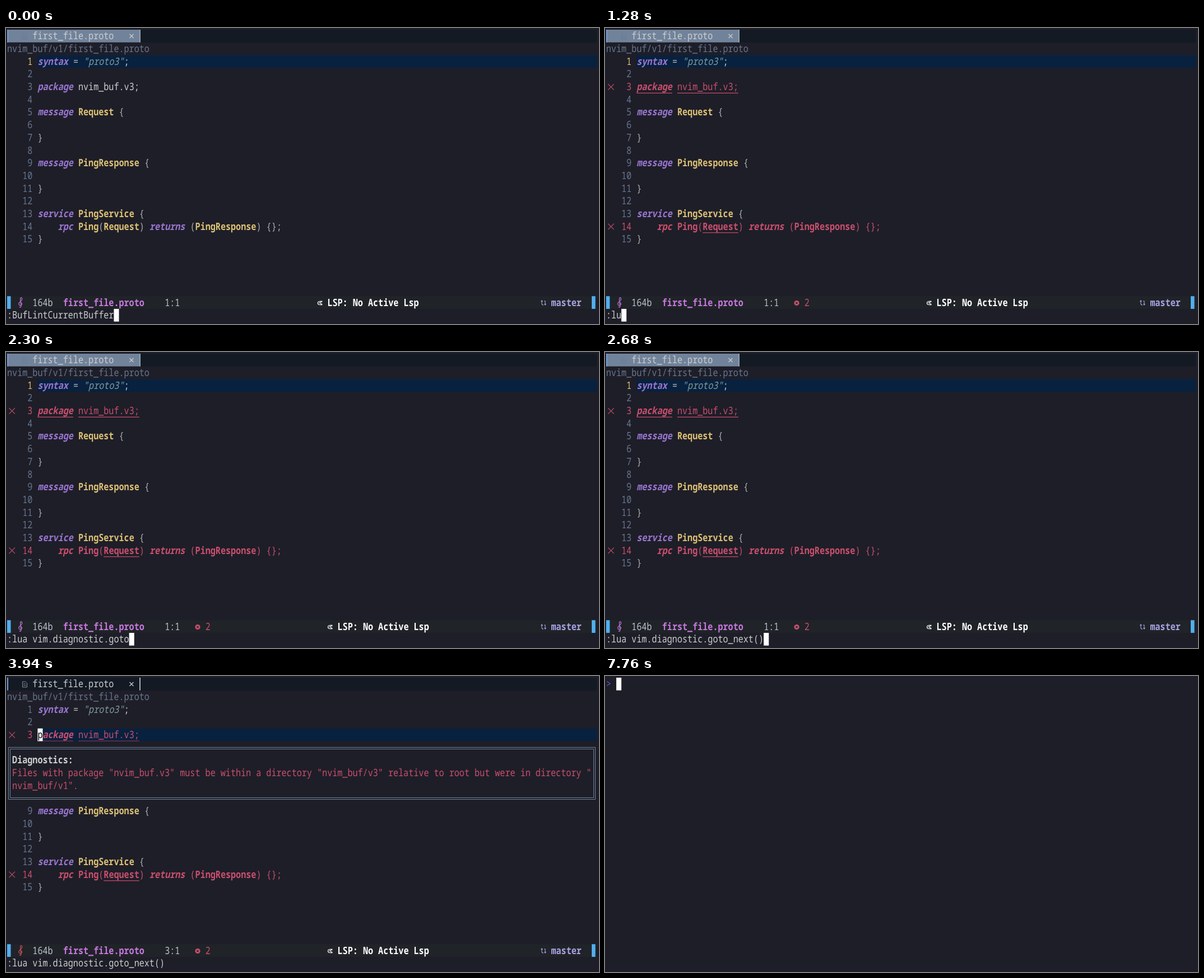
These frames come from a looping animation (1058 px wide and 529 px high, 8000 ms). An HTML page:

```html
<!DOCTYPE html>
<html lang="en">
<head>
<meta charset="utf-8">
<title>Editor lint session</title>
<style>
  html, body { margin: 0; width: 100%; height: 100%; overflow: hidden; background: #1e1e28; }
  svg { display: block; width: 100vw; height: 100vh; }
  text {
    font: 15.12px "Noto Sans Mono", "DejaVu Sans Mono", monospace;
    white-space: pre;
    text-rendering: geometricPrecision;
  }
  .bold, .keyword, .type { font-weight: 600; }
  .keyword, .string { font-style: italic; }
</style>
</head>
<body>
<svg id="stage" viewBox="0 0 1058 529"></svg>
<script>
const LOOP = 8000;
const CELL = { w: 9.07, h: 22.68, left: 2, top: 3 };
const COLS = 116;
const COLOR = {
  bg: '#1e1e28', bar: '#131a24', status: '#202328', tab: '#71839b',
  cursorLine: '#08213f', muted: '#66768e', text: '#cdcecf', plain: '#aeafb0',
  keyword: '#9876d0', type: '#dbc074', string: '#7f9c96', error: '#c94f6d',
  blue: '#51afef', magenta: '#c678dd', violet: '#a9a1e1', red: '#d3505f',
  prompt: '#5b56e0', white: '#ffffff'
};

// Each token is [text, style]; tokens follow each other on the cell grid.
const SOURCE = {
  1: [['syntax', 'keyword'], [' = ', 'plain'], ['"proto3"', 'string'], [';', 'text']],
  3: [['package', 'keyword'], [' ', 'plain'], ['nvim_buf.v3;', 'text']],
  5: [['message', 'keyword'], [' ', 'plain'], ['Request', 'type'], [' {', 'plain']],
  7: [['}', 'plain']],
  9: [['message', 'keyword'], [' ', 'plain'], ['PingResponse', 'type'], [' {', 'plain']],
  11: [['}', 'plain']],
  13: [['service', 'keyword'], [' ', 'plain'], ['PingService', 'type'], [' {', 'plain']],
  14: [['    ', 'plain'], ['rpc', 'keyword'], [' ', 'plain'], ['Ping', 'type'], ['(', 'plain'],
       ['Request', 'type'], [') ', 'plain'], ['returns', 'keyword'], [' (', 'plain'],
       ['PingResponse', 'type'], [') {};', 'plain']],
  15: [['}', 'plain']]
};
const LINE_COUNT = 15;
const CODE_COL = 6;
const ERROR_SPANS = { 3: [[6, 7], [14, 12]], 14: [[19, 7]] };

const LINT = ':BufLintCurrentBuffer';
const JUMP = ':lua vim.diagnostic.goto_next()';
const TYPING = [[1200, 1], [1280, 3], [1340, 4], [1900, 17], [1960, 18], [2020, 19], [2680, 31]];

const x = col => CELL.left + col * CELL.w;
const y = row => CELL.top + row * CELL.h;
const escapeText = s => s.replace(/&/g, '&amp;').replace(/</g, '&lt;').replace(/>/g, '&gt;');

const box = (left, top, width, height, fill) =>
  `<rect x="${left}" y="${top}" width="${width}" height="${height}" fill="${fill}"/>`;
const cells = (row, col, count, fill) => box(x(col), y(row), count * CELL.w, CELL.h, fill);
const stroke = (d, color, width = 1) =>
  `<path d="${d}" fill="none" stroke="${color}" stroke-width="${width}"/>`;
const write = (row, col, text, color, style = '') =>
  `<text class="${style}" fill="${color}" transform="translate(${x(col)} ${y(row) + 17.4}) scale(1 1.2)">${escapeText(text)}</text>`;

function cursor(row, col, char = '') {
  return cells(row, col, 1, COLOR.white) + write(row, col, char, '#000');
}

function tabBar(selected) {
  const icon = stroke('M29.5 10h5l3 3v7h-8z M31 14h4 M31 17h5', selected ? '#687990' : '#929aa5', 0.9);
  return cells(0, 0, COLS, COLOR.bar)
    + (selected ? box(2, 3, 238, CELL.h, COLOR.tab) : '')
    + box(2, 3, 2, CELL.h, '#719cd6')
    + box(238, 3, 2, CELL.h, selected ? '#91a0b2' : '#aeafb0')
    + icon
    + write(0, 5, 'first_file.proto', COLOR.text)
    + stroke('M220.5 11l7 7m0-7l-7 7', COLOR.text, 1.2)
    + write(1, 0, 'nvim_buf/v1/first_file.proto', COLOR.muted);
}

function codeLine(n, current, lint) {
  const row = n + 1;
  const broken = lint && ERROR_SPANS[n];
  const numberColor = broken ? COLOR.error : n === current ? COLOR.type : COLOR.muted;
  let out = n === current ? box(x(CODE_COL), y(row), x(COLS) - x(CODE_COL), CELL.h, COLOR.cursorLine) : '';
  out += write(row, 5 - String(n).length, String(n), numberColor);
  let col = CODE_COL;
  for (const [text, style] of SOURCE[n] || []) {
    if (text.trim()) out += write(row, col, text, broken ? COLOR.error : COLOR[style], style);
    col += text.length;
  }
  if (broken) {
    out += stroke(`M5.5 ${y(row) + 6.5}l10.5 10.5m0 -10.5l-10.5 10.5`, COLOR.error, 1.1);
    for (const [start, length] of broken) {
      out += box(x(start), y(row) + 22, length * CELL.w, 1.2, COLOR.error);
    }
  }
  return out;
}

function popup() {
  return box(2, y(5), 1052, CELL.h * 5, COLOR.bg)
    + stroke('M4.5 127.5H1051.5V220.5H4.5z M7.5 130.5H1048.5V217.5H7.5z', COLOR.tab)
    + write(6, 1, 'Diagnostics:', COLOR.text, 'bold')
    + write(7, 1, 'Files with package "nvim_buf.v3" must be within a directory "nvim_buf/v3" relative to root but were in directory "', COLOR.error)
    + write(8, 1, 'nvim_buf/v1".', COLOR.error);
}

function statusLine(s) {
  const lspCol = s.count ? 63 : 61;
  const lspX = x(lspCol);
  let out = cells(21, 0, COLS, COLOR.status)
    + box(x(0), y(21), 6.5, CELL.h, COLOR.blue)
    + box(x(COLS - 1), y(21), 6.5, CELL.h, COLOR.blue)
    + stroke('M24 498q2 3 3-1L25.5 484q1-4 3-1q1 3-3 6q-4 3-2 6q3 2 5-1q0-4-3-2',
        s.normal ? COLOR.red : COLOR.magenta, 1.2)
    + write(21, 5, '164b', '#bbc2cf')
    + write(21, 11, 'first_file.proto', COLOR.magenta, 'bold')
    + write(21, 31, s.line + ':1', '#bbc2cf')
    + stroke(`M${lspX + 9} 488.5q-8-1-8 3q0 4 8 3 M${lspX + 9} 494l-5-3l5-2`, COLOR.white, 1.3)
    + write(21, lspCol + 2, 'LSP: No Active Lsp', COLOR.white, 'bold')
    + stroke('M956 488v5q0 2 3 2 M960 488h2v6 M954.5 489l1.5-2l1.5 2 M960.5 493l1.5 2l1.5-2', COLOR.violet, 1.1)
    + write(21, 107, 'master', COLOR.violet, 'bold');
  if (s.count) {
    out += `<circle cx="342" cy="491.5" r="4.6" fill="${COLOR.error}"/>`
      + stroke('M340.4 489.9l3.2 3.2m0-3.2l-3.2 3.2', COLOR.status, 1.2)
      + write(21, 39, '2', COLOR.error);
  }
  return out;
}

function editor(s) {
  let out = tabBar(s.tab);
  for (let n = 1; n <= LINE_COUNT; n++) out += codeLine(n, s.line, s.lint);
  if (s.popup) out += popup();
  out += statusLine(s) + write(22, 0, s.command, COLOR.text);
  return out + (s.normal
    ? cursor(s.line + 1, CODE_COL, SOURCE[s.line][0][0][0])
    : cursor(22, s.command.length));
}

function shell(s) {
  if (!s.ready) return cursor(0, 0);
  return write(0, 0, '>', COLOR.prompt) + (s.blinkOn ? cursor(0, 2) : '');
}

function typedCount(t) {
  for (let i = 1; i < TYPING.length; i++) {
    const [t0, n0] = TYPING[i - 1], [t1, n1] = TYPING[i];
    if (t < t1) return Math.floor(n0 + (n1 - n0) * (t - t0) / (t1 - t0) + 1e-6);
  }
  return JUMP.length;
}

function stateAt(t) {
  if (t >= 6500) return { shell: true, ready: t >= 6540, blinkOn: t < 7140 || t >= 7760 };
  const jumped = t >= 3900;
  return {
    tab: !jumped,
    line: jumped ? 3 : 1,
    lint: t >= 480,
    count: t >= 940,
    popup: t >= 3940,
    normal: jumped || (t >= 440 && t < 1200),
    command: t < 1200 ? LINT : JUMP.slice(0, typedCount(t))
  };
}

const stage = document.getElementById('stage');
const start = performance.now();
let shown = '';

function render() {
  const state = stateAt((performance.now() - start) % LOOP);
  const key = JSON.stringify(state);
  if (key !== shown) {
    shown = key;
    stage.innerHTML = box(0, 0, 1058, 529, COLOR.bg) + (state.shell ? shell(state) : editor(state));
  }
  requestAnimationFrame(render);
}
render();
</script>
</body>
</html>
```
